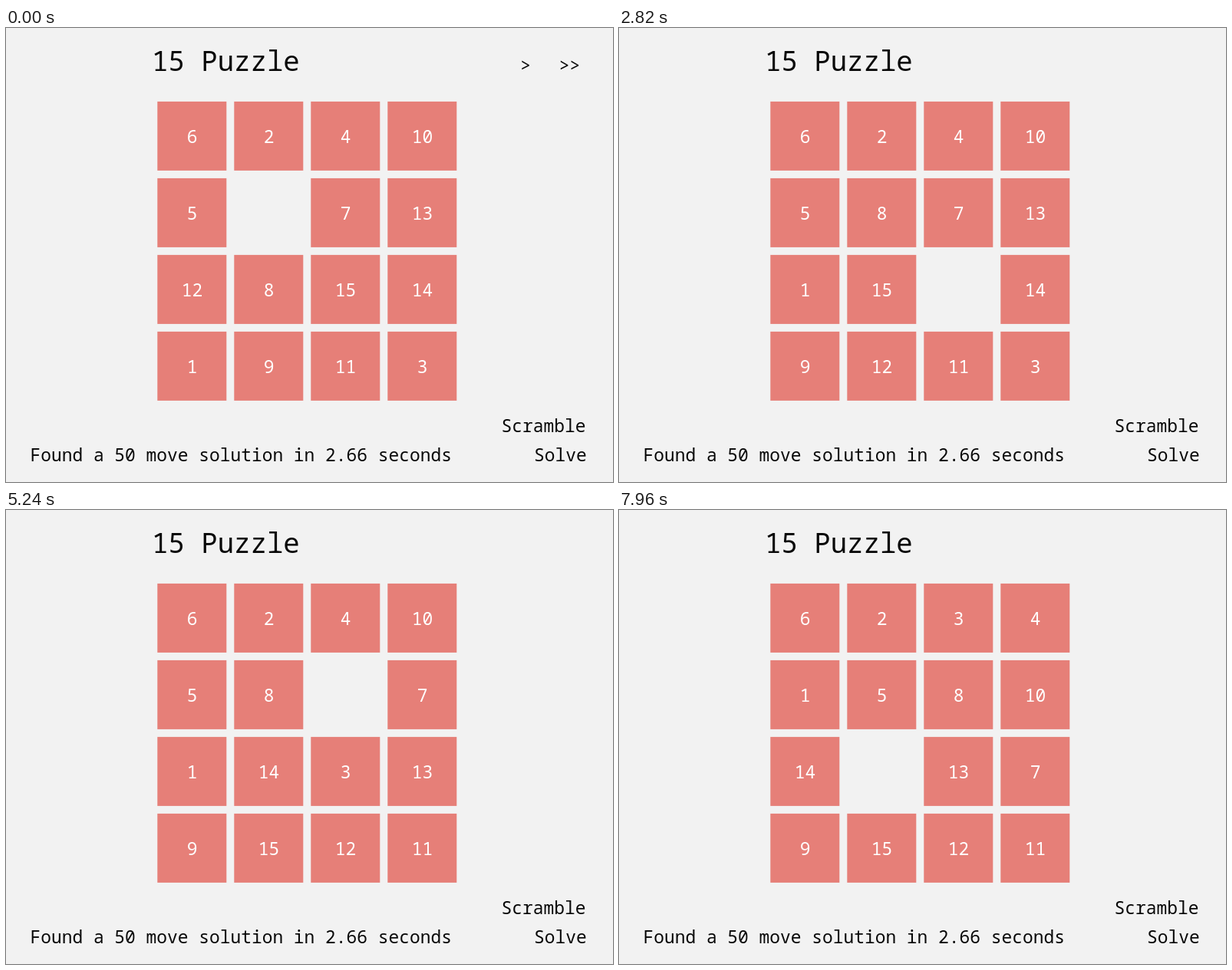
An HTML page with a canvas for the animation above (8000 ms loop, 791 by 592 pixels).

```html
<!DOCTYPE html>
<html lang="en">
<head>
<meta charset="utf-8">
<title>15 Puzzle</title>
<style>
html, body { margin: 0; width: 100%; height: 100%; overflow: hidden; background: #f2f2f2; }
canvas { display: block; }
</style>
</head>
<body>
<canvas id="stage" width="791" height="592"></canvas>
<script>
const ctx = document.getElementById('stage').getContext('2d');
const LOOP = 8000;
const START = [6, 2, 4, 10, 5, 0, 7, 13, 12, 8, 15, 14, 1, 9, 11, 3];

// Path of the empty cell, and the moment of each move in ms
const MOVES = 'DLDRURRDLLURRULDRUULDLLDR';
const TIMES = [1480, 1790, 2030, 2270, 2580, 2820, 3130, 3360, 3680, 3910, 4150, 4460, 4690,
  5010, 5240, 5550, 5780, 6090, 6330, 6560, 6870, 7100, 7410, 7650, 7960];
const OFFSET = { U: -4, D: 4, L: -1, R: 1 };

// Pointer waypoints: time, x, y
const POINTER = [[220, 785, 329], [460, 764, 222], [700, 730, 118], [860, 707, 70],
  [1010, 702, 45], [1250, 718, 32], [1330, 729, 46], [2110, 729, 46], [2190, 768, 62]];
const POINTER_END = 2270;
const STEP = 1030 / 13;

function boardAt(t) {
  const board = START.slice();
  let gap = board.indexOf(0);
  for (let i = 0; i < MOVES.length && TIMES[i] <= t; i++) {
    const next = gap + OFFSET[MOVES[i]];
    board[gap] = board[next];
    board[next] = 0;
    gap = next;
  }
  return board;
}

function text(str, x, y, size = 22.9, color = '#080808', align = 'left') {
  ctx.font = `${size}px "Noto Sans Mono", monospace`;
  ctx.fillStyle = color;
  ctx.textAlign = align;
  ctx.fillText(str, x, y);
}

function drawBoard(board) {
  board.forEach((value, i) => {
    if (!value) return;
    const x = 197.3 + (i % 4) * 100, y = 95.9 + (i >> 2) * 100;
    ctx.fillStyle = '#e67f78';
    ctx.fillRect(x, y, 90, 90);
    text(value, x + 45.2, y + 54.1, 22.9, '#fff', 'center');
  });
}

function drawPointer(t) {
  if (t < POINTER[0][0] || t >= POINTER_END) return;
  // The pointer is sampled in coarse steps
  const time = 220 + Math.floor((t - 220) / STEP + 0.02) * STEP;
  let i = 0;
  while (i < POINTER.length - 2 && POINTER[i + 1][0] <= time) i++;
  const [t0, x0, y0] = POINTER[i], [t1, x1, y1] = POINTER[i + 1];
  const k = Math.min(1, (time - t0) / (t1 - t0));
  ctx.save();
  ctx.translate(Math.round(x0 + (x1 - x0) * k) + 0.5, Math.round(y0 + (y1 - y0) * k) + 0.5);
  ctx.lineWidth = 1;
  ctx.strokeStyle = '#2a1717';
  ctx.fillStyle = '#fff';
  const arrow = new Path2D('M0 0V16L3.7 12.4L6.3 18.5L9 17.4L6.5 11.4H11.3Z');
  ctx.fill(arrow);
  ctx.stroke(arrow);
  ctx.restore();
}

function draw(now) {
  const t = now % LOOP;
  ctx.fillStyle = '#f2f2f2';
  ctx.fillRect(0, 0, 791, 592);
  text('15 Puzzle', 190, 56, 35.7);
  if (t < TIMES[0]) {
    text('>', 677, 57, 22.9, '#080808', 'center');
    text('>>', 734.5, 57, 22.9, '#080808', 'center');
  }
  drawBoard(boardAt(t));
  text('Scramble', 645.5, 527);
  text('Solve', 688, 564.5);
  text('Found a 50 move solution in 2.66 seconds', 31.5, 564.5);
  drawPointer(t);
}

const origin = performance.now();
function tick() {
  draw(performance.now() - origin);
  requestAnimationFrame(tick);
}
tick();
</script>
</body>
</html>
```
